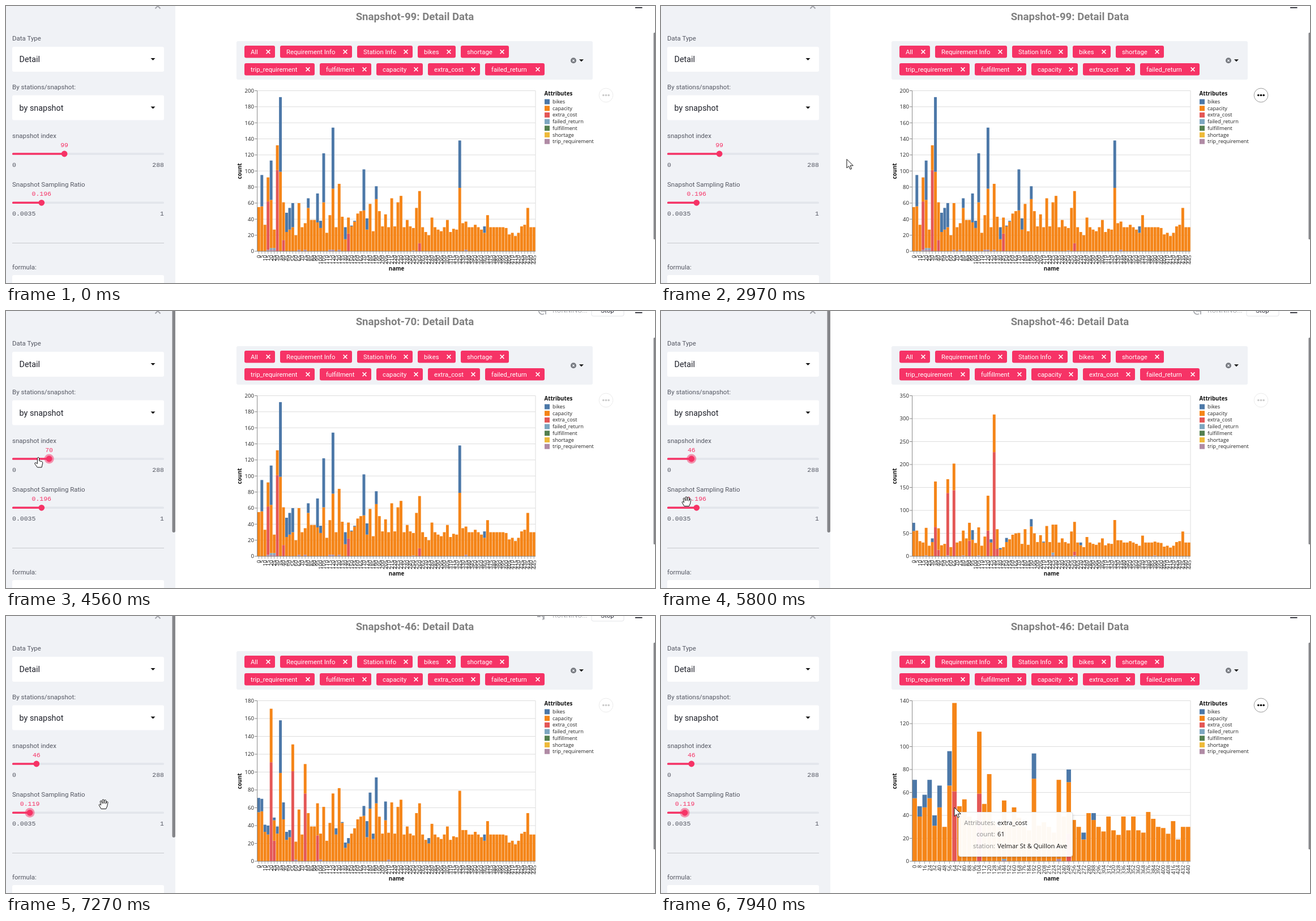
An HTML page that plays this animation: 1146 px wide and 489 px high, repeating every 8000 ms.

```html
<!DOCTYPE html>
<html lang="en">
<head>
<meta charset="utf-8">
<title>Snapshot detail</title>
<style>
html, body { margin: 0; width: 100%; height: 100%; overflow: hidden; background: #fff; }
svg { position: absolute; left: 0; top: 0; display: block; }
text { font: 11.5px Roboto, sans-serif; fill: #31333f; white-space: pre; }
.label { fill: #555863; }
.value { font-size: 14.4px; fill: #20222b; }
.mono { font-family: "Liberation Mono", monospace; fill: #555863; }
.pink { fill: #f63366; }
.title { font-size: 18.6px; font-weight: 600; fill: #808080; text-anchor: middle; }
.chip { font-size: 11.3px; fill: #fff; }
.axis { font: 9.6px "Open Sans", sans-serif; fill: #222; text-anchor: end; }
.key { font: 9.2px "Open Sans", sans-serif; fill: #222; }
.head { font: bold 9.7px "Open Sans", sans-serif; fill: #111; }
.faint { font-size: 12px; fill: #b4b6bb; }
.end { text-anchor: end; }
.mid { text-anchor: middle; }
#tip { position: absolute; display: grid; grid-template-columns: 55px auto; column-gap: 4px;
  padding: 8px 9px; box-sizing: border-box; border-radius: 3px; white-space: nowrap;
  background: rgba(255,255,255,.95); box-shadow: 0 0 0 1px #e3e3e3, 1px 2px 5px rgba(0,0,0,.18);
  font: 11.2px/20.3px "Open Sans", sans-serif; color: #111; }
#tip i { font-style: normal; text-align: right; color: #8a8a8a; }
</style>
</head>
<body>
<svg id="stage" width="1146" height="489" viewBox="0 0 1146 489"></svg>
<div id="tip"></div>
<svg id="pointer" width="1146" height="489" viewBox="0 0 1146 489"></svg>
<script>
const LOOP = 8000;
const stage = document.getElementById('stage');
const tip = document.getElementById('tip');

function add(tag, attrs, parent = stage, text) {
  const node = document.createElementNS('http://www.w3.org/2000/svg', tag);
  for (const name in attrs) node.setAttribute(name, attrs[name]);
  if (text !== undefined) node.textContent = text;
  return parent.appendChild(node);
}
const rect = (x, y, width, height, fill, parent, rx = 0) =>
  add('rect', { x, y, width, height, fill, rx }, parent);
const label = (x, y, text, cls = 'label', parent) => add('text', { x, y, class: cls }, parent, text);
const line = (d, stroke, width = 1, parent) =>
  add('path', { d, stroke, 'stroke-width': width, fill: 'none' }, parent);
const cross = (x, y, r, stroke, width) =>
  line(`M${x - r} ${y - r}l${2 * r} ${2 * r}m0 ${-2 * r}l${-2 * r} ${2 * r}`, stroke, width);
const caret = (x, y) => add('path', { d: `M${x - 4} ${y - 2}h8l-4 4z`, fill: '#111' });
const show = (node, on) => node.setAttribute('visibility', on ? 'visible' : 'hidden');

// Sidebar
rect(0, 0, 299, 489, '#f0f2f6');
cross(268, 0, 4.5, '#a3a5ab', 2);
[[61, 'Data Type', 72, 'Detail'], [147, 'By stations/snapshot:', 157.5, 'by snapshot']].forEach(([y, name, top, value]) => {
  label(11, y, name);
  rect(11, top, 268, 44, '#fff', stage, 3);
  label(23.5, top + 27, value, 'value');
  caret(259.5, top + 22);
});
line('M11 418.5H279', '#c6c8cd');
label(11, 465, 'formula:');
rect(11, 475, 268, 20, '#fff', stage, 3);

function slider(y, name, min, max) {
  label(11, y - 28, name);
  label(11, y + 23, min, 'mono');
  label(279, y + 23, max, 'mono end');
  rect(11, y - 1.8, 268, 3.6, '#e2e5eb', stage, 1.5);
  const fill = rect(11, y - 1.8, 0, 3.6, '#f63366', stage, 1.5);
  const glow = add('circle', { cy: y, r: 8.5, fill: '#f63366', opacity: .5 });
  const thumb = add('circle', { cy: y, r: 5.4, fill: '#f63366' });
  const number = label(0, y - 12, '', 'mono pink mid');
  return (value, focused) => {
    const x = 11 + 268 * (value - min) / (max - min);
    fill.setAttribute('width', x - 11);
    glow.setAttribute('cx', x);
    thumb.setAttribute('cx', x);
    number.setAttribute('x', x);
    number.textContent = value;
    show(glow, focused);
  };
}
const setIndex = slider(261, 'snapshot index', 0, 288);
const setRatio = slider(347.3, 'Snapshot Sampling Ratio', 0.0035, 1);
const sideScroll = rect(293.5, -10, 5.5, 401, '#85868a', stage, 2.7);

// Header and filter chips
const title = label(722, 25, '', 'title');
rect(1111, 2, 12.5, 1.8, '#262730');
rect(1143.5, 47, 4, 365, '#85868a', stage, 1.5);
rect(407, 62, 629, 68, '#f0f2f6', stage, 3);
const chips = [
  [70, [['All', 421, 475], ['Requirement Info', 484, 611], ['Station Info', 620, 718], ['bikes', 727, 794], ['shortage', 803, 888]]],
  [101, [['trip_requirement', 421, 545], ['fulfillment', 554, 645], ['capacity', 654, 736], ['extra_cost', 745, 837], ['failed_return', 846, 951]]]
];
for (const [y, row] of chips) for (const [name, left, right] of row) {
  rect(left, y, right - left, 21.5, '#f63366', stage, 3);
  label(left + 11, y + 14.8, name, 'chip');
  cross(right - 12, y + 10.8, 3.4, '#fff', 1.6);
}
add('circle', { cx: 1002, cy: 96.3, r: 5, fill: '#777a80' });
cross(1002, 96.3, 1.7, '#f0f2f6', 1.2);
caret(1016, 96.3);

const running = add('g', {});
const icons = ['M941-1a6 6 0 0 0 9 6M944 0h9v6', 'M938 1l6 0M945-1l4 3-1 5M950 0v6'].map(d => line(d, '#aaacb1', 1.8, running));
label(965, 3.2, 'RUNNING...', 'faint', running);
add('rect', { x: 1034, y: -14, width: 57, height: 23, rx: 3, fill: '#fff', stroke: '#e3e4e8' }, running);
label(1062, 2.8, 'Stop', 'mid', running);

// Legend and chart menu
const COLORS = { bikes: '#4c78a8', capacity: '#f58518', extra_cost: '#e45756', failed_return: '#7da7c0',
  fulfillment: '#54804f', shortage: '#eeba3b', trip_requirement: '#b08ba5' };
label(950.5, 157.5, 'Attributes', 'head');
Object.keys(COLORS).forEach((name, i) => {
  const y = 169 + 11.7 * i;
  rect(951, y - 4.5, 9, 9, COLORS[name]);
  label(965, y + 3, name, 'key');
});
const menu = add('g', {});
add('circle', { cx: 1059.5, cy: 157.5, r: 12.3, fill: '#fff', stroke: '#999' }, menu);
for (const x of [1054.8, 1059.5, 1064.2]) add('circle', { cx: x, cy: 157.5, r: 1.8, fill: '#000' }, menu);

// Charts
const LEFT = 443.6, RIGHT = 935, TOP = 149.5, BASE = 433;
const STACK = ['trip_requirement', 'failed_return', 'extra_cost', 'capacity', 'bikes'];
const capacity = [
  55, 56, 33, 30, 60, 23, 31, 99, 47, 24, 27, 30, 20, 58, 30, 33, 54, 39, 39, 36, 29, 61, 23, 43, 76, 30, 82, 43, 15, 20,
  31, 37, 47, 50, 51, 27, 59, 25, 65, 50, 31, 46, 30, 66, 31, 61, 69, 30, 39, 31, 28, 54, 65, 30, 24, 20, 42, 30, 27, 25,
  30, 39, 24, 28, 27, 79, 35, 35, 30, 30, 33, 30, 27, 23, 45, 30, 30, 30, 30, 30, 29, 21, 23, 19, 23, 31, 33, 54, 30, 30];
const sparseCapacity = [
  55, 39, 47, 55, 31, 47, 30, 66, 77, 48, 54, 39, 36, 54, 50, 76, 34, 30, 51, 31, 47, 38, 30, 27, 72, 31, 34, 30,
  25, 69, 39, 45, 36, 30, 19, 42, 36, 30, 26, 39, 27, 23, 39, 27, 39, 27, 25, 43, 37, 30, 29, 24, 35, 19, 30, 30];

function chart(max, tick, every, data) {
  const group = add('g', {});
  const scale = (BASE - TOP) / max, count = data.capacity.length, step = (RIGHT - LEFT) / count;
  const segments = [];
  for (let v = 0; v <= max; v += tick) {
    const y = BASE - v * scale;
    line(`M${LEFT} ${y}H${RIGHT}`, '#ddd', 1, group);
    line(`M${LEFT - 4.5} ${y}h4.5`, '#888', 1, group);
    label(438, y + 3.4, v, 'axis', group);
  }
  line(`M${RIGHT} ${TOP}V${BASE}`, '#ddd', 1, group);
  for (let i = 0; i < count; i++) {
    const x = LEFT + step * (i + .05), mid = LEFT + step * (i + .5);
    let y = BASE;
    for (const name of STACK) {
      const value = (data[name] || {})[i];
      if (!value) continue;
      const height = value * scale;
      y -= height;
      rect(x, y, step * .9, height, COLORS[name], group);
      segments.push({ x, y, right: x + step * .9, bottom: y + height, name, value, i });
    }
    line(`M${mid} ${BASE}v4.5`, '#888', .8, group);
    add('text', { class: 'axis', transform: `translate(${mid + 3.4} 439.5) rotate(-90)` }, group, i * every);
  }
  line(`M${LEFT} ${TOP}V${BASE}H${RIGHT}`, '#888', 1, group);
  return { group, segments };
}

const charts = [
  chart(200, 20, 5, { capacity,
    bikes: { 1: 39, 4: 49, 7: 93, 9: 24, 10: 27, 11: 30, 16: 12, 19: 36, 20: 9, 21: 61, 24: 76, 28: 15, 30: 1, 31: 1, 34: 51, 35: 14, 38: 16, 65: 59, 73: 8 },
    extra_cost: { 3: 60, 6: 101, 8: 14, 29: 22, 52: 10 },
    failed_return: { 4: 2, 5: 2 },
    trip_requirement: { 3: 2, 4: 2, 5: 2, 13: 2, 15: 2, 23: 2, 24: 2, 26: 2, 50: 1, 67: 2 } }),
  chart(350, 50, 5, { capacity,
    bikes: { 0: 18, 6: 8, 19: 21, 25: 7, 28: 3, 30: 9, 38: 16, 42: 2, 54: 6 },
    extra_cost: { 7: 64, 8: 14, 11: 136, 13: 144, 18: 34, 24: 56, 26: 227, 27: 16, 52: 8 },
    failed_return: { 45: 4 },
    trip_requirement: { 4: 2, 11: 2, 16: 2, 21: 2, 45: 4, 52: 2, 78: 2 } }),
  chart(180, 20, 5, { capacity,
    bikes: { 0: 16, 1: 14, 2: 8, 3: 10, 5: 3, 6: 8, 7: 59, 8: 19, 9: 9, 10: 8, 25: 7, 27: 1, 28: 6, 29: 6, 34: 11, 35: 18, 36: 18, 37: 6, 38: 29, 41: 21, 55: 6, 73: 7 },
    extra_cost: { 4: 111, 5: 23, 11: 101, 15: 76, 19: 29 },
    trip_requirement: { 12: 2, 20: 2, 42: 2, 50: 1 } }),
  chart(140, 20, 8, { capacity: sparseCapacity,
    bikes: { 0: 16, 1: 9, 2: 11, 3: 16, 4: 9, 5: 19, 7: 30, 24: 22, 31: 11, 34: 6, 36: 6 },
    extra_cost: { 8: 61, 13: 59, 31: 24 },
    trip_requirement: { 18: 1, 29: 2 }, failed_return: { 18: 1 } })
];
add('text', { class: 'head mid', transform: 'translate(416 291.5) rotate(-90)' }, stage, 'count');
label(689.5, 467, 'name', 'head mid');

// Pointer: time, x, y, shape until the next key
const path = [
  [0, 1150, 147, ''], [370, 1138, 147, 'arrow'], [920, 1031, 455, 'arrow'], [2000, 1031, 455, 'arrow'],
  [2000, 735, 433, 'arrow'], [2070, 735, 433, 'arrow'], [2760, 449, 273, 'arrow'], [2830, 449, 273, ''],
  [2970, 328, 270.5, 'arrow'], [3080, 328, 270.5, 'arrow'], [3500, 110, 261, 'hand'], [3680, 76, 258, 'hand'],
  [4150, 76, 258, 'hand'], [4560, 57, 258, 'hand'], [4620, 57, 258, 'hand'], [4890, 54, 258, 'hand'],
  [5400, 54, 258, 'hand'], [5540, 52, 290, 'grab'], [5800, 45, 336, 'grab'], [5860, 45, 336, 'grab'],
  [6080, 46, 347, 'hand'], [6230, 46, 347, 'hand'], [6360, 43, 348, 'hand'], [6970, 43, 348, 'hand'],
  [7040, 60, 342, 'grab'], [7270, 172, 332, 'grab'], [7330, 172, 332, 'grab'], [7440, 299, 330, 'arrow'],
  [7730, 521, 329, 'arrow'], [7790, 521, 331, 'arrow'], [7940, 518, 338, 'arrow'], [LOOP, 518, 338, 'arrow']
];
const shapes = {
  arrow: 'M0 0V15.5L3.7 12.2 6.2 17.8 8.6 16.8 6.2 11.3H11.3Z',
  hand: 'M-1.6 1.5q1.6-2.6 3.2 0V6.5l4.6 1.2q1.8.6 1.5 3L6 18H-1.6L-6.3 11.5q0-2.2 2.2-1.6l2.5 1.7z',
  grab: 'M-4 8.5L-8 1.5q1-2.5 3.7.5L-5.8-5q1.2-2 2.6 0L-2-1V-7.2q1.5-2 3 0V-1L2-6.8q1.7-1.5 2.7.3L4.3-.5 5.7-4q1.9-1 2.3.8L6.6 4 4.6 8.5Z'
};
const pointer = add('path', { fill: '#fff', stroke: '#111', 'stroke-linejoin': 'round' }, document.getElementById('pointer'));

function locate(t) {
  let k = path.length - 1;
  while (path[k][0] > t) k--;
  const [t0, x0, y0, shape] = path[k];
  const [t1, x1, y1] = path[k + 1] || path[k];
  const p = t1 > t0 ? (t - t0) / (t1 - t0) : 0;
  return { x: x0 + (x1 - x0) * p, y: y0 + (y1 - y0) * p, shape };
}

const stations = ['Velmar St & Quillon Ave', 'Dunmoor Plaza'];
function showTip(hit, x, y) {
  tip.style.display = hit ? 'grid' : 'none';
  if (!hit) return;
  tip.style.left = x + 8 + 'px';
  tip.style.top = y + 9 + 'px';
  tip.replaceChildren();
  const rows = { Attributes: hit.name, count: hit.value, station: stations[hit.i % 2] };
  for (const key in rows) {
    tip.appendChild(document.createElement('i')).textContent = key + ':';
    tip.appendChild(document.createElement('span')).textContent = rows[key];
  }
}

const within = (t, spans) => spans.some(([a, b]) => t >= a && t < b);
const countPast = (t, times) => times.filter(time => t >= time).length;
const clamp = v => Math.max(0, Math.min(1, v));

function render(t) {
  const { x, y, shape } = locate(t);
  show(pointer, shape);
  if (shape) {
    pointer.setAttribute('d', shapes[shape]);
    pointer.setAttribute('transform', `translate(${x} ${y})`);
  }
  setIndex([99, 70, 46][countPast(t, [3940, 5180])], t >= 3940 && t < 6750);
  setRatio(t < 6750 ? 0.196 : 0.119, t >= 6750);
  title.textContent = `Snapshot-${[99, 70, 46][countPast(t, [4290, 5540])]}: Detail Data`;
  show(sideScroll, t > 3000 && x < 299);
  show(running, within(t, [[4220, 4890], [5470, 6140], [7040, 7730]]));
  icons.forEach((icon, i) => icon.setAttribute('opacity', i === (t < 6500 ? 0 : 1) ? 1 : 0));

  const active = countPast(t, [4830, 6080, 7600]);
  charts.forEach((c, i) => show(c.group, i === active));
  const dark = t < 2000 ? 0 : t < 6000 ? 1 - clamp((t - 3080) / 400) : clamp((t - 7480) / 250);
  menu.setAttribute('opacity', .2 + .8 * dark);

  const hit = shape === 'arrow' && charts[active].segments.find(s =>
    x >= s.x && x <= s.right && y >= s.y && y <= s.bottom);
  showTip(hit, x, y);
}

function frame(now) {
  render(now % LOOP);
  requestAnimationFrame(frame);
}
render(0);
requestAnimationFrame(frame);
</script>
</body>
</html>
```
